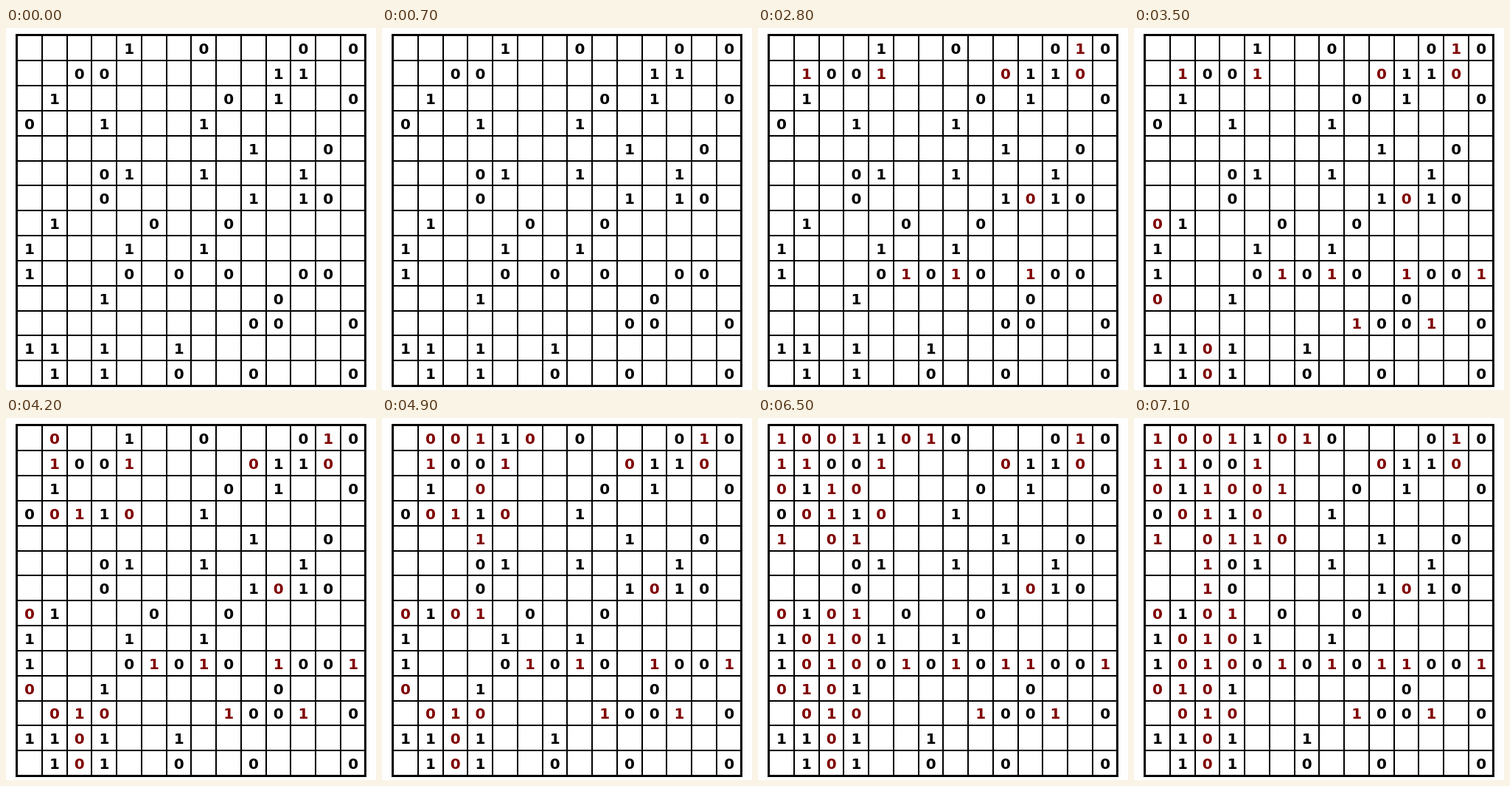
An HTML page for the animation above (7200 ms loop, 502x490 px).

```html
<!DOCTYPE html>
<html lang="en">
<head>
<meta charset="utf-8">
<title>Binary puzzle</title>
<style>
  html, body { margin: 0; width: 100%; height: 100%; overflow: hidden; background: #fff; }
  svg { display: block; width: 502px; height: 490px; }
  text { font: bold 20px "DejaVu Sans", sans-serif; text-anchor: middle; }
  .grid { fill: none; stroke: #000; stroke-width: 2; shape-rendering: crispEdges; }
  .frame { stroke-width: 3; }
  .move { fill: #800000; visibility: hidden; }
</style>
</head>
<body>
<svg id="board" viewBox="0 0 502 490"></svg>
<script>
const LOOP = 7200, START = 2000, STEP = 100;
const N = 14, LEFT = 15, TOP = 10.5, CELL_W = 33.77, CELL_H = 33.82;

const givens = [
  '....1..0...0.0',
  '..00......11..',
  '.1......0.1..0',
  '0..1...1......',
  '.........1..0.',
  '...01..1...1..',
  '...0.....1.10.',
  '.1...0..0.....',
  '1...1..1......',
  '1...0.0.0..00.',
  '...1......0...',
  '.........00..0',
  '11.1..1.......',
  '.1.1..0..0...0'
];

// Each move: row and column in hex, then the digit.
const moves = (
  '0c1 111 141 190 1c0 6a0 951 971 9a1 9d1 b81 bb1 c20 d20 700 a00 ' +
  '010 310 321 340 b10 b21 b30 431 731 720 230 031 020 050 061 001 ' +
  '221 200 101 401 420 830 930 921 a20 a11 910 991 810 821 ' +
  '521 621 240 441 251 450'
).split(' ');

const board = document.getElementById('board');

function add(tag, attrs, content = '') {
  const el = document.createElementNS('http://www.w3.org/2000/svg', tag);
  for (const key in attrs) el.setAttribute(key, attrs[key]);
  el.textContent = content;
  return board.appendChild(el);
}

function addDigit(row, col, digit, cls) {
  return add('text', {
    x: LEFT + (col + 0.5) * CELL_W + 0.2,
    y: TOP + (row + 0.5) * CELL_H + 8,
    class: cls
  }, digit);
}

let lines = '';
for (let i = 1; i < N; i++) {
  lines += `M${Math.round(LEFT + i * CELL_W)} 10V485`;
  lines += `M15 ${Math.round(TOP + i * CELL_H)}H488`;
}
add('path', { d: lines, class: 'grid' });
add('rect', { x: 14.5, y: 9.5, width: 473, height: 475, class: 'grid frame' });

givens.forEach((line, row) => [...line].forEach((digit, col) => {
  if (digit !== '.') addDigit(row, col, digit, 'given');
}));

const filled = moves.map(([row, col, digit]) =>
  addDigit(parseInt(row, 16), parseInt(col, 16), digit, 'move'));

const origin = performance.now();
let shown = 0;

function draw(now) {
  const t = Math.max(0, now - origin) % LOOP;
  const count = Math.max(0, Math.floor((t - START) / STEP) + 1);
  if (count !== shown) {
    filled.forEach((el, i) => { el.style.visibility = i < count ? 'visible' : 'hidden'; });
    shown = count;
  }
  requestAnimationFrame(draw);
}
requestAnimationFrame(draw);
</script>
</body>
</html>
```
